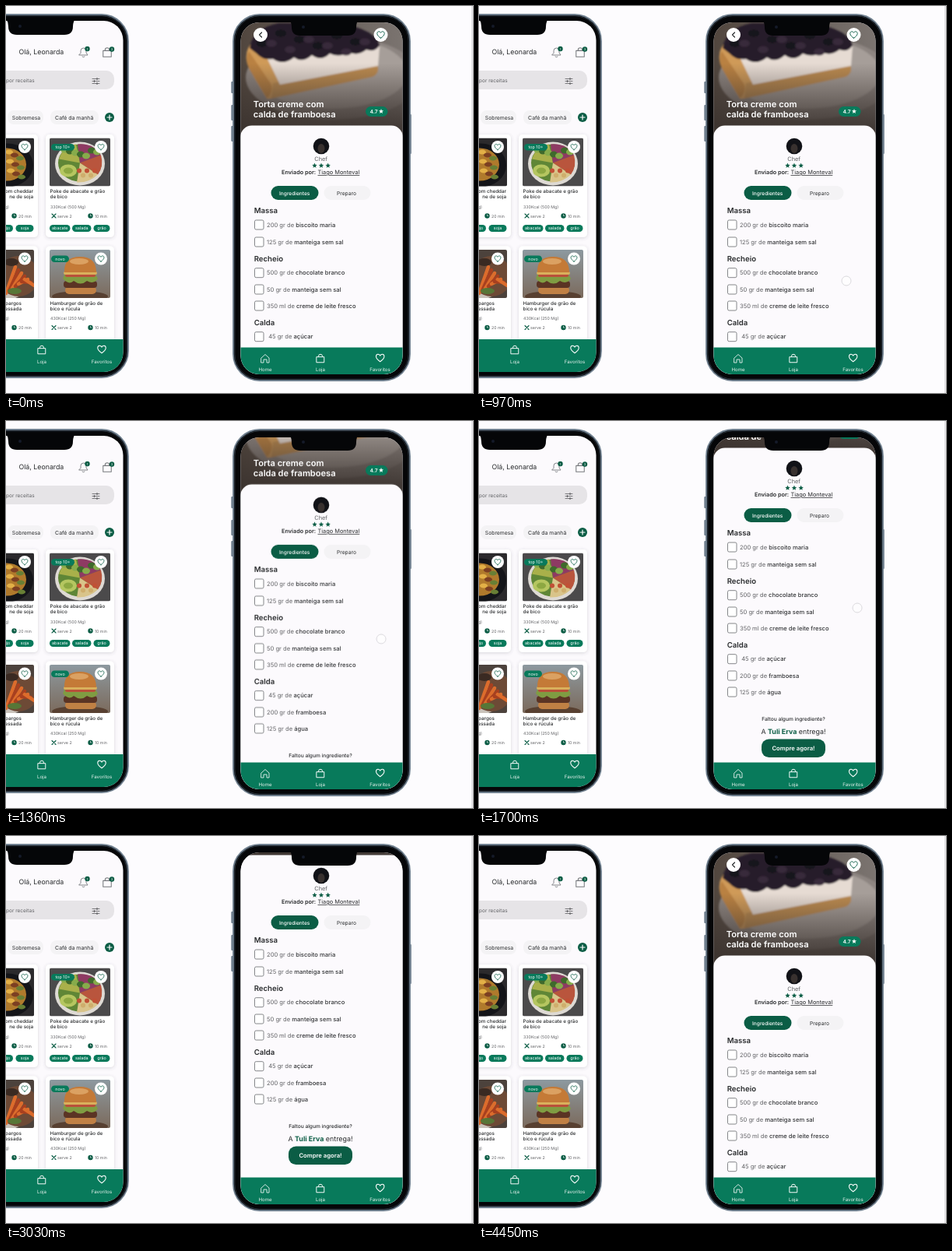
An HTML page that plays this animation: 600 px wide and 497 px high, repeating every 4.48 s.

```html
<!DOCTYPE html>
<html lang="pt-BR">
<head>
<meta charset="utf-8">
<title>Receitas</title>
<style>
  html, body { margin: 0; width: 100%; height: 100%; overflow: hidden; background: #fdfcfe; }
  svg { display: block; width: 100vw; height: 100vh; }
  text { font-family: Inter, "Open Sans", sans-serif; text-rendering: geometricPrecision; white-space: pre; }
</style>
</head>
<body>
<svg id="stage" viewBox="0 0 600 497"></svg>
<script>
const GREEN = '#087a5b', DEEP = '#0b5d45', INK = '#292b2d', GRAY = '#626366', PAPER = '#fcfafd';
const LOOP = 4480;

const rect = (x, y, w, h, r, fill, extra = '') =>
  `<rect x="${x}" y="${y}" width="${w}" height="${h}" rx="${r}" fill="${fill}" ${extra}/>`;
const oval = (x, y, rx, ry, fill, extra = '') =>
  `<ellipse cx="${x}" cy="${y}" rx="${rx}" ry="${ry}" fill="${fill}" ${extra}/>`;
const dot = (x, y, r, fill, extra) => oval(x, y, r, r, fill, extra);
const shape = (d, fill, extra = '') => `<path d="${d}" fill="${fill}" ${extra}/>`;
const line = (d, color, width = 1) =>
  shape(d, 'none', `stroke="${color}" stroke-width="${width}" stroke-linecap="round" stroke-linejoin="round"`);
const text = (x, y, size, str, { fill = INK, weight = 400, anchor = 'start' } = {}) =>
  `<text x="${x}" y="${y}" font-size="${size}" fill="${fill}" font-weight="${weight}" text-anchor="${anchor}">${str}</text>`;
const mid = (x, y, size, str, fill = INK, weight = 400) =>
  text(x, y, size, str, { fill, weight, anchor: 'middle' });
const at = (x, y, body, scale = 1) => `<g transform="translate(${x} ${y}) scale(${scale})">${body}</g>`;
const repeat = (count, draw) => Array.from({ length: count }, (_, i) => draw(i)).join('');

const heart = (x, y, color, scale = 1) => at(x, y,
  line('M0 5 C-3 3 -5.5 .5 -5.5 -2 C-5.5 -5.5 -1.3 -6 0 -3 C1.3 -6 5.5 -5.5 5.5 -2 C5.5 .5 3 3 0 5 Z', color, 1.1), scale);
const bag = (x, y, color, scale = 1) => at(x, y,
  line('M-5 -2.5 H5 V5 H-5 Z M-2.5 -2.5 V-4 Q-2.5 -6 0 -6 Q2.5 -6 2.5 -4 V-2.5', color, 1), scale);
const house = (x, y, color) => at(x, y,
  line('M-5 -1 L0 -5.5 L5 -1 V5 H2 V1 H-2 V5 H-5 Z', color, .8));
const star = (x, y, r, fill) => {
  const points = Array.from({ length: 10 }, (_, i) => {
    const a = i * Math.PI / 5 - Math.PI / 2, d = i % 2 ? r * .45 : r;
    return `${(x + d * Math.cos(a)).toFixed(2)},${(y + d * Math.sin(a)).toFixed(2)}`;
  });
  return `<polygon points="${points.join(' ')}" fill="${fill}"/>`;
};
const heartButton = (x, y, r, scale) => dot(x, y, r, '#fff') + heart(x, y, DEEP, scale);

const fade = (id, from, to) =>
  `<linearGradient id="${id}" x2="0" y2="1"><stop stop-color="${from}"/><stop offset="1" stop-color="${to}"/></linearGradient>`;
const clip = (id, body) => `<clipPath id="${id}">${body}</clipPath>`;
const defs = `<defs>
  ${clip('leftScreen', rect(-60, 19, 210.5, 451, 25, '#000'))}
  ${clip('rightScreen', rect(301.5, 21, 208, 452, 24, '#000'))}
  ${clip('cover', rect(301, 21, 209, 150, 0, '#000'))}
  ${clip('dish', rect(0, 0, 78, 62, 2, '#000'))}
  ${fade('wall', '#8d999f', '#7b6a5c')}
  <linearGradient id="table"><stop stop-color="#51463e"/><stop offset="1" stop-color="#7b7470"/></linearGradient>
  <linearGradient id="shade" x2="0" y2="1"><stop offset=".35" stop-color="#3a322e" stop-opacity="0"/>
    <stop offset=".9" stop-color="#3a322e" stop-opacity=".88"/></linearGradient>
  <filter id="blur"><feGaussianBlur stdDeviation="1"/></filter>
  <filter id="soft" x="-20%" y="-20%" width="140%" height="140%">
    <feDropShadow dx="0" dy="1" stdDeviation="2" flood-color="#50505a" flood-opacity=".22"/></filter>
</defs>`;

// Pictures of dishes, each placed with the top left corner of its frame at 0,0 (78 x 62).
const dish = (back, body) => `<g clip-path="url(#dish)">${rect(0, 0, 78, 62, 0, back)}${body}</g>`;
const bowl = () => dish('#4b4a4b', oval(39, 33, 32, 28, '#dedad4') + oval(39, 32, 28, 24, '#5f8636') +
  shape('M39 32 L12 27 Q18 10 34 8 Z', '#a9b04a') + shape('M39 32 L36 8 Q56 6 66 22 Z', '#8e3a63') +
  shape('M39 32 L66 22 Q70 36 62 47 Z', '#b9553d') + shape('M39 32 L62 47 Q50 58 35 57 Z', '#d9c48a') +
  repeat(7, i => oval(19 + i * 7, 15 + i * 11 % 9, 5, 4, i % 2 ? '#3f6a2c' : '#86ab4b')) +
  oval(24, 42, 11, 8, '#b5c660') + oval(24, 42, 6, 4, '#8da842') +
  repeat(5, i => dot(38 + i * 5, 42 + i % 2 * 6, 3, i % 2 ? '#cfae6c' : '#c15035')));
const burger = () => dish('url(#wall)', oval(39, 60, 36, 7, '#584031') +
  rect(20, 47, 40, 10, 5, '#c08044') + rect(18, 40, 43, 9, 4, '#5b3424') +
  shape('M17 37 Q25 46 31 40 Q40 47 48 40 Q57 45 62 37 L59 32 H19 Z', '#7f9c42') +
  rect(20, 31, 39, 4, 2, '#b9503a') + rect(18, 28, 43, 4, 2, '#d9b05c') +
  shape('M19 29 Q18 9 39 9 Q60 9 60 29 Z', '#c47a37') + oval(38, 15, 12, 4, '#dba162'));
const noodles = () => dish('#2b2a2c', oval(44, 35, 33, 28, '#141519') + oval(43, 34, 25, 21, '#b07a2c') +
  repeat(9, i => oval(46 + i * 7 % 20, 18 + i * 4, 5, 3, ['#e3b047', '#7c3f22', '#687f35'][i % 3])));
const carrots = () => dish('#4c423c', oval(42, 40, 30, 24, '#c9c2ba') + oval(58, 34, 26, 26, '#6d4a36') +
  repeat(7, i => line(`M${42 + i * 4} ${56 - i * 3} L${54 + i * 4} ${22 + i * 4}`, i % 2 ? '#a8401f' : '#dc6c2c', 4.5)) +
  oval(53, 53, 9, 4, '#577637') + oval(49, 16, 9, 5, '#3a2a22'));

const minutes = (x, y, label) => dot(x, y, 3.2, DEEP) + line(`M${x} ${y - 1.6} V${y} H${x + 1.3}`, '#fff', .6) +
  text(x + 5.5, y + 2, 5.2, label, { fill: GRAY });
const tag = (x, y, w, label, h = 9) => rect(x, y, w, h, h / 2, GREEN) + mid(x + w / 2, y + h / 2 + 1.8, 5.4, label, '#fff');
const title = (x, y, rows, anchor) => rows.map((row, i) =>
  text(x, y + i * 7.2, 6.3, row, { weight: 500, anchor })).join('');
const cardBase = (x, y, picture) => rect(x, y, 88, 132, 5, '#fff', 'filter="url(#soft)"') + at(x + 5, y + 4.5, picture);

const fullCard = (y, picture, badge, badgeWidth, rows, energy) =>
  cardBase(51, y, picture) + tag(58, y + 12, badgeWidth, badge, 8.5) + heartButton(122, y + 16, 8, .72) +
  title(56.5, y + 75, rows) + text(57, y + 94.5, 5.3, energy, { fill: GRAY }) +
  line(`M59 ${y + 102} L64 ${y + 107} M64 ${y + 102} L59 ${y + 107}`, DEEP, 1.1) +
  text(66, y + 106.5, 5.3, 'serve 2', { fill: GRAY }) + minutes(108.5, y + 104.5, '10 min');
const cutCard = (y, picture, rows, end) =>
  cardBase(-47, y, picture) + heartButton(24, y + 16, 8, .72) + title(end, y + 75, rows, 'end') +
  text(4, y + 94.5, 5.3, 'Mg)', { fill: GRAY, anchor: 'end' }) + minutes(10.5, y + 104.5, '20 min');

const navItem = (x, y, icon, label) => icon + mid(x, y, 6.1, label, '#e9f4ef');
const badge = (x, y, n) => dot(x, y, 3.2, DEEP) + mid(x, y + 1.5, 4, n, '#fff');

const body = (x, bottom) =>
  rect(x, 11, 227, bottom - 11, 34, '#050608', 'stroke="#6f7f8e" stroke-width="1.8"') +
  rect(x + 1.9, 12.9, 223.2, bottom - 14.8, 32, 'none', 'stroke="#28323c" stroke-width="1"');
const notch = (x, y) => shape(`M${x - 4} 15 Q${x} ${y - 17} ${x} ${y - 11} Q${x} ${y} ${x + 11} ${y} H${x + 72} Q${x + 83} ${y} ${x + 83} ${y - 11} Q${x + 83} ${y - 17} ${x + 87} 15 Z`, '#050608') +
  dot(x + 15, y - 11, 2, '#151b29');

const leftPhone = body(-70, 477) + `<g clip-path="url(#leftScreen)">` +
  rect(-60, 19, 212, 452, 0, PAPER) +
  text(16.5, 62.3, 8.8, 'Olá, Leonarda') +
  line('M94 63 H105 L103 60 V57.5 Q103 54 99.5 54 Q96 54 96 57.5 V60 Z M98 65 Q99.5 66.5 101 65', '#77797d', .9) +
  badge(104.5, 55, 1) + bag(130, 60, '#77797d', 1.05) + badge(136, 55.5, 3) +
  rect(-40, 83, 179, 24, 10, '#e6e4e7') + text(0, 97.5, 6.5, 'por receitas', { fill: GRAY }) +
  line('M111 93.5 H120 M111 96.5 H120 M111 99.5 H120', '#5d5e61', .8) +
  line('M117 92.5 V94.5 M113.5 95.5 V97.5 M117 98.5 V100.5', '#5d5e61', 1.2) +
  rect(2, 134, 46, 18, 8, '#f4f3f5') + mid(26, 145.5, 6.8, 'Sobremesa') +
  rect(57, 134, 62, 18, 8, '#f4f3f5') + mid(87.7, 145.5, 6.9, 'Café da manhã') +
  dot(133, 143, 6, DEEP) + line('M130 143 H136 M133 140 V146', '#fff', 1.2) +
  cutCard(165, noodles(), ['com cheddar', 'ne de soja'], 35) + tag(-14, 281, 23, 'queijo') + tag(12.5, 281, 23, 'soja') +
  fullCard(165, bowl(), 'top 10+', 30, ['Poke de abacate e grão', 'de bico'], '330Kcal (500 Mg)') +
  tag(56, 281, 26.5, 'abacate') + tag(85, 281, 24.5, 'salada') + tag(112.5, 281, 21, 'grão') +
  cutCard(308.5, carrots(), ['aspargos', 'essada'], 20) +
  fullCard(308.5, burger(), 'novo', 23, ['Hamburger de grão de', 'bico e rúcula'], '430Kcal (250 Mg)') +
  rect(-60, 428, 212, 43, 0, GREEN) +
  navItem(46, 459, bag(46, 442, '#fff', .95), 'Loja') + navItem(123, 459, heart(123, 441, '#fff', .95), 'Favoritos') +
  '</g>' + notch(3, 37);

const cover = `<g clip-path="url(#cover)">` + rect(301, 21, 209, 150, 0, 'url(#table)') +
  `<g filter="url(#blur)">` +
  oval(420, 92, 112, 54, '#8d8581') + oval(418, 86, 98, 46, '#a69e99') +
  shape('M318 46 Q307 54 309 70 L319 92 L335 119 Q350 121 354 101 L345 66 Z', '#cf9a58') +
  shape('M312 58 Q306 68 312 80 L335 118 Q343 113 341 101 Z', '#b98142') +
  shape('M343 99 L476 74 Q482 85 471 91 L341 119 Z', '#bb8a50') +
  shape('M333 62 L480 52 L478 77 L352 101 Z', '#e6dbd3') +
  shape('M313 54 Q317 29 350 22 H430 Q475 31 480 50 Q475 60 463 56 Q452 65 440 59 Q429 67 416 61 Q405 72 393 63 Q381 74 370 66 Q356 77 343 68 Q330 70 322 61 Z', '#261d29') +
  repeat(12, i => oval(329 + i * 12, 48 + (i * 7) % 13 - (i % 3) * 7, 7, 4.5, i % 2 ? '#392a3a' : '#17151c')) +
  '</g>' + rect(301, 21, 209, 150, 0, 'url(#shade)') + '</g>';

const ingredient = (y, label) => {
  const cut = label.indexOf(' de ') + 4;
  return rect(319.5, y - 6, 11.5, 12, 1.8, '#fff', 'stroke="#77797c" stroke-width=".9"') +
    text(335, y + 2.7, 7.6, `${label.slice(0, cut)}<tspan font-weight="500" fill="#343638">${label.slice(cut)}</tspan>`, { fill: GRAY });
};
const section = (y, name, rows, labels) => text(318.7, y, 9.6, name, { weight: 600 }) +
  labels.map((label, i) => ingredient(rows[i], label)).join('');

const recipe = cover +
  dot(327, 37, 9, '#fff') + line('M328.5 34 L325.5 37 L328.5 40', INK, 1.2) + heartButton(481.5, 37, 9, .85) +
  text(317.7, 129.8, 11.1, 'Torta creme com', { fill: '#fff', weight: 600 }) +
  text(317.7, 142.6, 11.1, 'calda de framboesa', { fill: '#fff', weight: 600 }) +
  rect(462, 129, 28.5, 13, 6.5, GREEN) + text(467.5, 137.8, 6.6, '4.7', { fill: '#fff', weight: 600 }) + star(482, 135.3, 3.2, '#fff') +
  rect(301, 153.6, 209, 520, 15, PAPER) +
  dot(405, 180, 10.3, '#111217') + oval(405, 183, 4.5, 6, '#38312f') +
  mid(404.7, 198.7, 7.4, 'Chef', GRAY) + [396.5, 405, 413.7].map(x => star(x, 205, 3.4, DEEP)).join('') +
  text(354, 216, 7.3, 'Enviado por:', { weight: 600 }) +
  text(400.5, 216, 7.4, '<tspan text-decoration="underline">Tiago Monteval</tspan>') +
  rect(340.5, 231, 61, 18, 9, DEEP) + mid(370.7, 242.5, 6.6, 'Ingredientes', '#fff', 500) +
  rect(408.5, 231, 60, 18, 9, '#f4f3f5') + mid(437.5, 242.5, 6.7, 'Preparo') +
  section(266.3, 'Massa', [281, 303], ['200 gr de biscoito maria', '125 gr de manteiga sem sal']) +
  section(328, 'Recheio', [342.7, 364, 385],
    ['500 gr de chocolate branco', '50 gr de manteiga sem sal', '350 ml de creme de leite fresco']) +
  section(410, 'Calda', [424.7, 446, 467], [' 45 gr de açúcar', '200 gr de framboesa', '125 gr de água']) +
  mid(404, 504, 6.6, 'Faltou algum ingrediente?', INK, 500) +
  mid(404, 521, 8.9, `A <tspan font-weight="700" fill="${DEEP}">Tuli Erva</tspan> entrega!`) +
  rect(363, 527.5, 82, 23.5, 9.5, DEEP) + mid(404, 542, 7.7, 'Compre agora!', '#fff', 600);

const rightPhone =
  [[97, 15], [127, 20], [154, 20]].map(([y, h]) => rect(289.3, y, 3, h, 1, '#6f7f8e')).join('') +
  rect(518.3, 139, 2.5, 51, 1, '#6f7f8e') + body(292, 481) +
  `<g clip-path="url(#rightScreen)">` + rect(301, 21, 209, 453, 0, PAPER) +
  `<g id="recipe">${recipe}</g>` +
  `<g id="touch">${dot(0, 0, 6, '#fff', 'fill-opacity=".5" stroke="#d9d8dc" stroke-width="1"')}</g>` +
  rect(301, 438.5, 209, 35, 0, GREEN) +
  navItem(333, 468.8, house(333, 453, '#fff'), 'Home') +
  navItem(404, 468.8, bag(404, 453, '#fff', .95), 'Loja') +
  navItem(480.5, 468.8, heart(480.7, 452, '#fff', .95), 'Favoritos') +
  '</g>' + notch(367, 38);

document.getElementById('stage').innerHTML = defs + rect(0, 0, 600, 497, 0, '#fdfcfe') +
  leftPhone + rightPhone + rect(598.4, 0, 1, 497, 0, '#cbcacd');

const play = (id, steps) => document.getElementById(id).animate(
  steps.map(([ms, style, easing = 'linear']) => ({ offset: ms / LOOP, easing, ...style })),
  { duration: LOOP, iterations: Infinity });

const scrolled = y => ({ transform: `translate(0px, ${-y}px)` });
play('recipe', [
  [0, scrolled(0)], [980, scrolled(0)], [1120, scrolled(34)], [1360, scrolled(72)],
  [1700, scrolled(119), 'ease-out'], [2060, scrolled(129)],
  [3850, scrolled(129), 'cubic-bezier(.35, .1, .3, 1)'], [4390, scrolled(0)], [LOOP, scrolled(0)]
]);

const finger = (x, y, opacity) => ({ transform: `translate(${x}px, ${y}px)`, opacity });
play('touch', [
  [0, finger(472, 353, 0)], [820, finger(472, 353, 0)], [940, finger(472, 353, 1)], [980, finger(472, 353, 1)],
  [1120, finger(476, 318, 1)], [1360, finger(482, 280, 1)], [1700, finger(486, 240, 1)],
  [1950, finger(487, 232, 0)], [LOOP, finger(487, 232, 0)]
]);
</script>
</body>
</html>
```
